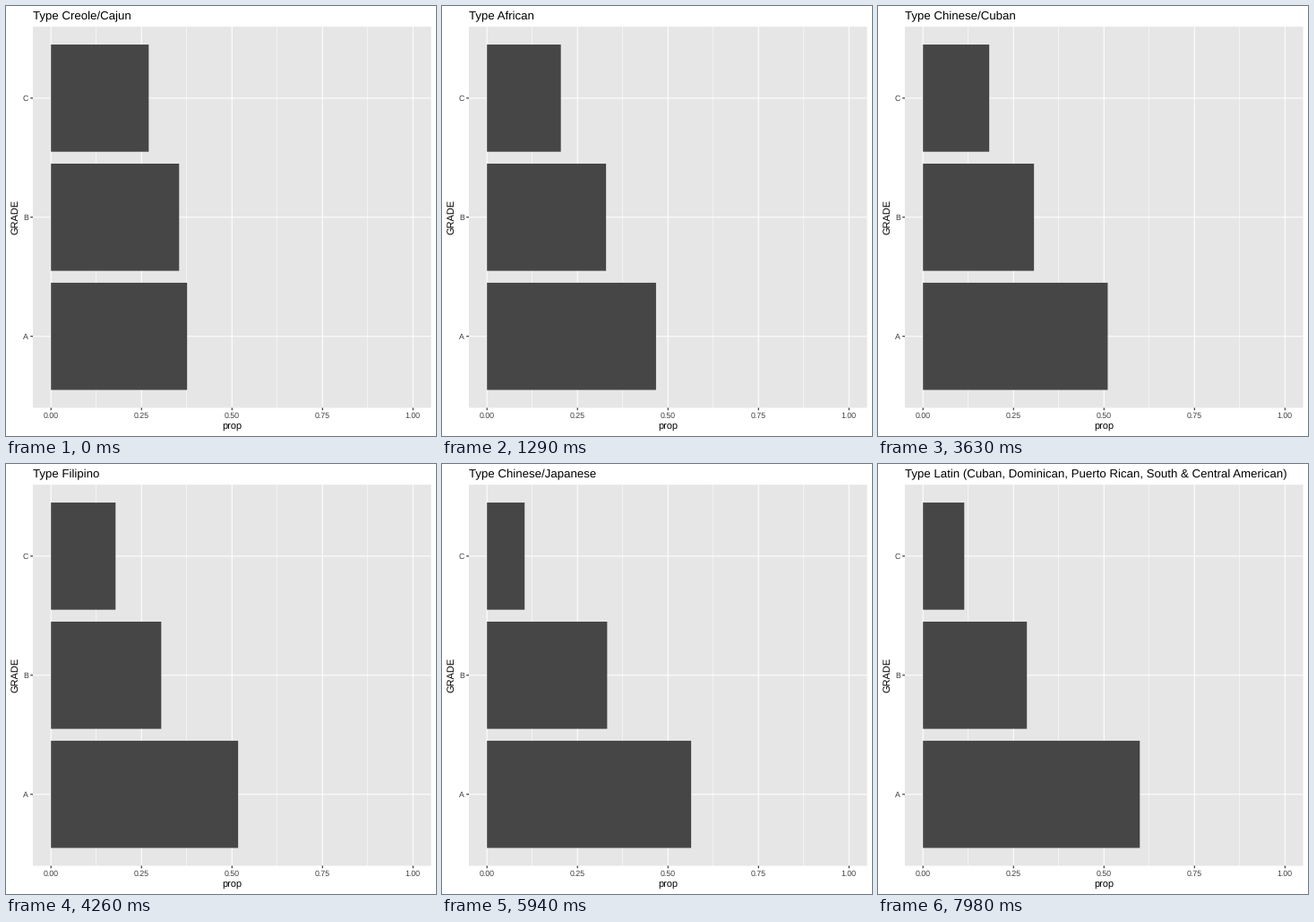
A matplotlib script that plays this animation: 480 px wide and 480 px high, repeating every 8 s.

```python
import matplotlib.pyplot as plt
from matplotlib.animation import FuncAnimation
from matplotlib.patches import Rectangle

plt.rcParams["font.family"] = "Liberation Sans"
plt.rcParams["text.hinting"] = "none"
plt.rcParams["text.hinting_factor"] = 8

SIZE, DPI = 480, 100
PT = 72 / DPI
LOOP, INTERVAL, STEP = 8000, 20, 30  # ms
LEFT, RIGHT, TOP, BOTTOM = 30, 474.5, 23.1, 448.5
UNIT = (RIGHT - LEFT) / 1.1
ROW = (BOTTOM - TOP) / 3.2
BAR, PANEL, LABEL, TICK = "#464646", "#e6e6e6", "#3c3c3c", "#222222"

# cuisine, share of A, share of C, first and last step of the move to the next
STATES = [
    ("Creole/Cajun", .376, .270, 3, 17),
    ("Bangladeshi", .460, .220, 22, 35),
    ("African", .467, .208, 42, 55),
    ("Pakistani", .467, .157, 59, 72),
    ("Creole", .470, .213, 79, 93),
    ("Korean", .490, .200, 97, 111),
    ("Chinese/Cuban", .507, .188, 116, 131),
    ("Indian", .517, .173, 135, 148),
    ("Filipino", .517, .183, 155, 165),
    ("Peruvian", .5315, .167, 173, 184),
    ("Caribbean", .564, .128, 190, 202),
    ("Chinese/Japanese", .564, .092, 208, 219),
    ("Spanish", .567, .133, 227, 236),
    ("Polish", .574, .128, 244, 256),
    ("Latin (Cuban, Dominican, Puerto Rican, South & Central American)",
     .5975, .1095, 263, 276),
    ("Mexican", .604, .129, 282, 295),
]

fig = plt.figure(figsize=(SIZE / DPI, SIZE / DPI), dpi=DPI, facecolor="white")
ax = fig.add_axes([0, 0, 1, 1])
ax.set_xlim(0, SIZE)
ax.set_ylim(SIZE, 0)
ax.axis("off")


def x_at(share):
    return LEFT + UNIT * (share + .05)


def y_at(row):
    return BOTTOM - ROW * (row + .6)


def rect(x, y, w, h, color, z):
    return ax.add_patch(Rectangle((x, y), w, h, fc=color, lw=0, zorder=z, snap=False))


def line(xs, ys, color, width=1.07):
    ax.plot(xs, ys, color=color, lw=width * PT, zorder=2,
            solid_capstyle="butt", snap=False)


def text(x, y, s, px, color="black", ha="center", **kw):
    return ax.text(x, y, s, fontsize=px * PT, color=color, ha=ha,
                   va="baseline", **kw)


rect(LEFT, TOP, RIGHT - LEFT, BOTTOM - TOP, PANEL, 1)
for i in range(4):
    x = x_at(.125 + i / 4)
    line([x, x], [TOP, BOTTOM], "white", .53)
for row, grade in enumerate("ABC"):
    y = y_at(row)
    line([LEFT, RIGHT], [y, y], "white")
    line([LEFT - 2.75, LEFT], [y, y], TICK)
    text(25, y + 3.2, grade, 8.8, LABEL, ha="right")
for i in range(5):
    x = x_at(i / 4)
    line([x, x], [TOP, BOTTOM], "white")
    line([x, x], [BOTTOM, BOTTOM + 2.75], TICK)
    text(x, 460, f"{i / 4:.2f}", 8.8, LABEL)

text(x_at(.5), 473, "prop", 11)
text(13.4, y_at(1), "GRADE", 11, rotation=90, rotation_mode="anchor")
title = text(LEFT, 15.2, "", 13.2, ha="left")
bars = [rect(x_at(0), y_at(r) - .45 * ROW, 0, .9 * ROW, BAR, 3) for r in range(3)]


def draw(frame):
    step = (frame * INTERVAL + INTERVAL // 2) // STEP
    i = sum(step > s[4] for s in STATES)
    now, after = STATES[i], STATES[i + 1]
    p = max(0, (step - now[3]) / (now[4] - now[3]))
    a, c = (now[k] + (after[k] - now[k]) * p for k in (1, 2))
    for bar, share in zip(bars, (a, 1 - a - c, c)):
        bar.set_width(share * UNIT)
    title.set_text("Type " + (now if p < .5 else after)[0])
    return [*bars, title]


anim = FuncAnimation(fig, draw, frames=LOOP // INTERVAL, interval=INTERVAL,
                     repeat=True, repeat_delay=0)
plt.show()
```
